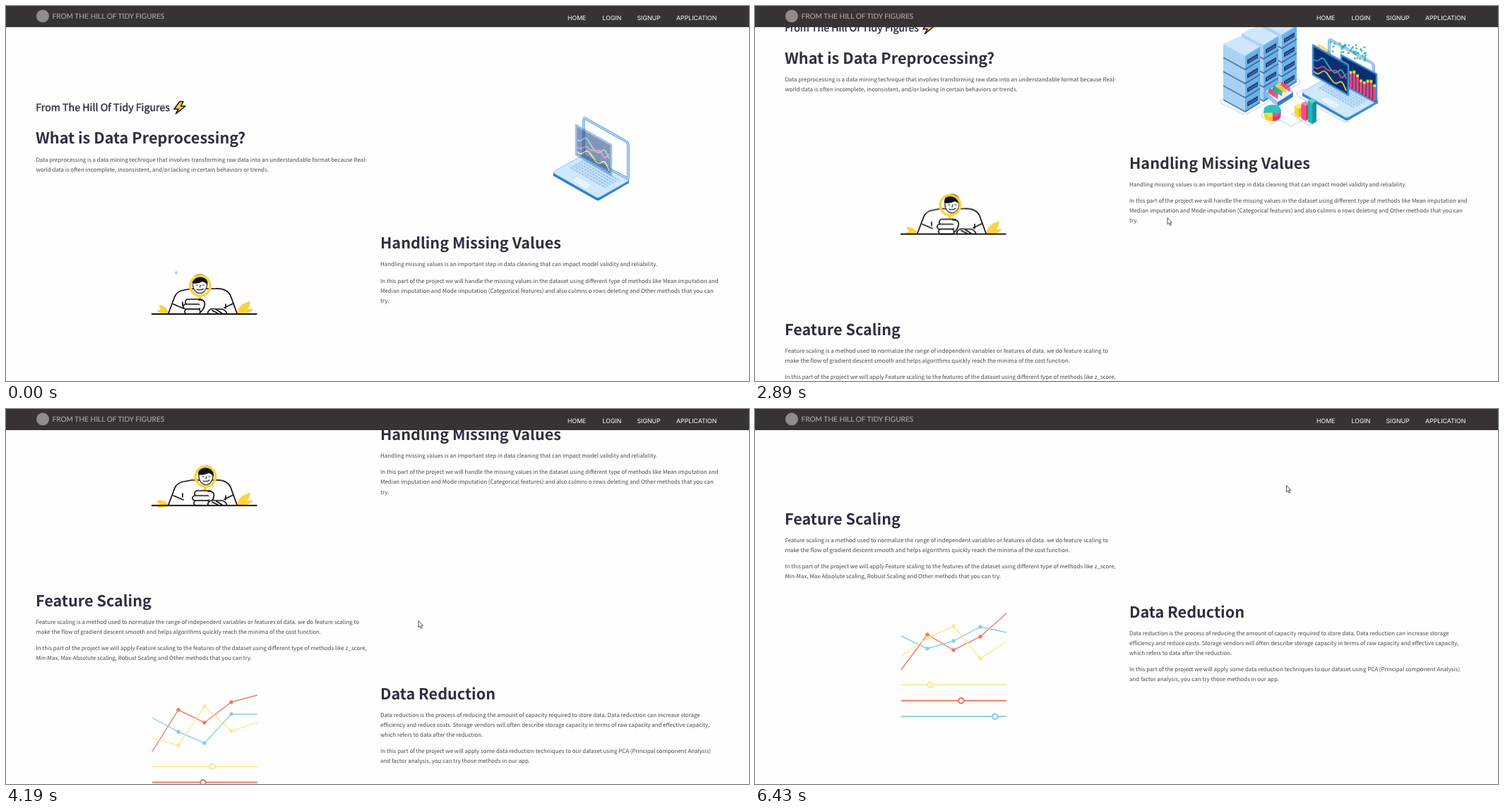
Write an HTML page that moves like this. It is 1052 px wide and 532 px high and loops after 6500 ms.

```html
<!DOCTYPE html>
<html lang="en">
<head>
<meta charset="utf-8">
<title>Data preprocessing</title>
<style>
html, body { margin: 0; width: 100%; height: 100%; overflow: hidden; background: #fefefe; }
svg { display: block; width: 100vw; height: 100vh; }
text { font-family: "Noto Sans CJK JP", "Noto Sans CJK SC", sans-serif; font-size: 7.91px; fill: #474752; text-rendering: geometricPrecision; white-space: pre; }
.title { font-size: 21.64px; font-weight: 700; fill: #2e2f3e; }
.lead { font-size: 14.2px; fill: #2e2f3e; stroke: #2e2f3e; stroke-width: .4px; }
.brand { font: 10.15px Lato, sans-serif; fill: #a5a2a2; stroke: #a5a2a2; stroke-width: .2px; }
.nav { font: 400 8.75px Inter, sans-serif; fill: #fff; }
.foot { font: 8.2px Lato, sans-serif; fill: #a3a3a6; }
.ink { fill: none; stroke: #111; stroke-width: 1.7px; stroke-linecap: round; stroke-linejoin: round; }
.fine { stroke-width: 1.1px; }
.white { fill: #fefefe; }
.thin { fill: none; stroke: #a9c8e6; stroke-width: 1px; }
.curve { fill: none; stroke-width: 1.4px; }
.slider { stroke-width: 1.9px; }
.knob { fill: #fefefe; stroke-width: 2.2px; }

.move { animation: 6.5s linear infinite; }
.page { animation-name: scroll; }
.cursor { animation-name: cursor; }
.lid { animation-name: lid; }
.front { animation-name: front; }
.side { animation-name: side; }
.dots { animation-name: dots; }
.bars { animation-name: bars; transform-origin: 0 281px; }
.link { animation-name: link; stroke-dasharray: 110; }
.pie { animation-name: pie; transform-origin: 732px 265px; }
.tower0, .tower1, .tower2 { transform-origin: 0 264px; }
.tower0 { animation-name: tower0; }
.tower1 { animation-name: tower1; }
.tower2 { animation-name: tower2; }
.floor { animation-name: floor; }
.drawer { animation-name: drawer; }
.lens { animation-name: lens; }
.head { animation-name: head; }
.fist { animation-name: fist; }
.leaf { animation-name: leaf; transform-origin: 231px 437px; }
.spark { animation-name: spark; }
.chart .move { animation-timing-function: ease-in-out; }
.curve.red { animation-name: red; }
.curve.blue { animation-name: blue; }
.curve.yellow { animation-name: yellow; }
.knob.red { animation-name: knobRed; }
.knob.blue { animation-name: knobBlue; }
.knob.yellow { animation-name: knobYellow; }

@keyframes scroll {
  0%, 36.9% { transform: translateY(0); }
  42.5% { transform: translateY(-95px); }
  52.77% { transform: translateY(-191px); }
  64.46% { transform: translateY(-300px); }
  83.1%, 86.1% { transform: translateY(-491px); }
  91.5%, 100% { transform: translateY(-416px); }
}
@keyframes cursor {
  0%, 8.2% { transform: translate(952px, 540px); }
  9.2% { transform: translate(945px, 525px); }
  10.3% { transform: translate(891px, 488px); }
  18% { transform: translate(795.5px, 476px); }
  21.2% { transform: translate(745px, 425px); }
  30.8%, 86.5% { transform: translate(583.5px, 300px); }
  98%, 100% { transform: translate(752px, 108px); }
}
@keyframes lid { 0% { transform: none; } 7%, 100% { transform: translate(-5px, 2px); } }
@keyframes front { 0% { transform: translate(17px, 0); opacity: .5; } 7%, 100% { transform: none; opacity: 1; } }
@keyframes side { 0%, 2% { transform: translate(-16px, -9px); opacity: 0; } 9%, 100% { transform: none; opacity: 1; } }
@keyframes dots { 0%, 10% { transform: translateY(14px); opacity: 0; } 16%, 100% { transform: none; opacity: 1; } }
@keyframes bars { 0%, 9% { transform: scaleY(0); } 15%, 100% { transform: none; } }
@keyframes link { 0%, 13% { stroke-dashoffset: 110; } 18% { stroke-dashoffset: 66; } 23%, 100% { stroke-dashoffset: 0; } }
@keyframes pie { 0%, 17.2% { transform: scale(0); } 18% { transform: scale(.2); } 22%, 100% { transform: none; } }
@keyframes tower0 { 0%, 23% { transform: scaleY(0); } 31.5%, 100% { transform: none; } }
@keyframes tower1 { 0%, 26% { transform: scaleY(0); } 33.8%, 100% { transform: none; } }
@keyframes tower2 { 0%, 28% { transform: scaleY(0); } 35.4%, 100% { transform: none; } }
@keyframes floor { 0%, 22% { opacity: 0; } 25%, 100% { opacity: 1; } }
@keyframes drawer { 0%, 38% { transform: translate(-16px, -9px); opacity: 0; } 45%, 100% { transform: none; opacity: 1; } }
@keyframes lens {
  0% { transform: translate(275px, 397px); }
  6%, 40% { transform: translate(268.5px, 396px); }
  48%, 100% { transform: translate(282.5px, 396px); }
}
@keyframes head {
  0% { transform: translate(274.5px, 394px); }
  6%, 40% { transform: translate(273.5px, 393px); }
  48%, 100% { transform: translate(283px, 394px); }
}
@keyframes fist {
  0% { transform: translateX(1px); }
  6%, 40% { transform: none; }
  48%, 100% { transform: translateX(14px); }
}
@keyframes leaf {
  0%, 50%, 54% { transform: none; }
  8%, 40%, 62%, 100% { transform: rotate(-22deg); }
}
@keyframes spark {
  0% { transform: translate(241px, 378.5px); opacity: 1; }
  4%, 49% { transform: translate(231px, 373px); opacity: 0; }
  52%, 54% { transform: translate(231px, 373px); opacity: .5; }
  57%, 100% { transform: translate(231px, 373px); opacity: 0; }
}
@keyframes red {
  0%, 52.77% { d: path("M207 786L244 735L281 741L319 709L356 706"); }
  64.46% { d: path("M207 786L244 727L281 745L319 716L356 706"); }
  85.38% { d: path("M207 786L244 759L281 713L319 727L356 707"); }
  98.9%, 100% { d: path("M207 786L244 736L281 758L319 739L356 706"); }
}
@keyframes blue {
  0%, 52.77% { d: path("M207 738L244 754L281 765L319 721L356 733"); }
  64.46% { d: path("M207 738L244 758L281 774L319 733L356 733"); }
  85.38% { d: path("M207 738L244 738L281 737L319 742L356 734"); }
  98.9%, 100% { d: path("M207 738L244 756L281 745L319 725L356 733"); }
}
@keyframes yellow {
  0%, 52.77% { d: path("M207 767L244 765L281 722L319 748L356 746"); }
  64.46% { d: path("M207 767L244 777L281 722L319 757L356 745"); }
  85.38% { d: path("M207 767L244 719L281 754L319 758L356 746"); }
  98.9%, 100% { d: path("M207 766L244 741L281 724L319 770L356 746"); }
}
@keyframes knobYellow { 0%, 64.46% { cx: 292px; } 85.38% { cx: 299px; } 98.9%, 100% { cx: 248px; } }
@keyframes knobRed { 0%, 64.46% { cx: 279px; } 85.38% { cx: 243px; } 98.9%, 100% { cx: 292px; } }
@keyframes knobBlue { 0%, 64.46% { cx: 300px; } 85.38% { cx: 318px; } 98.9%, 100% { cx: 340px; } }
</style>
</head>
<body>
<svg viewBox="0 0 1052 532" preserveAspectRatio="none">
<g class="page move">
  <text class="lead" x="42.3" y="149">From The Hill Of Tidy Figures</text>
  <path d="M246 135.500L238 146.300H244L240.500 152.800L254 142H247.600L251 135.500Z" fill="#fdc93c" stroke="#17171c" stroke-width="1.5" stroke-linejoin="round"/>
  <text class="title" x="42" y="195.3">What is Data Preprocessing?</text>
  <text x="42.4" y="220.6">Data preprocessing is a data mining technique that involves transforming raw data into an understandable format because Real-</text>
  <text x="42.4" y="234.8">world data is often incomplete, inconsistent, and/or lacking in certain behaviors or trends.</text>

  <text class="title" x="530" y="344.3">Handling Missing Values</text>
  <text x="530" y="369.4">Handling missing values is an important step in data cleaning that can impact model validity and reliability.</text>
  <text x="530" y="392.6">In this part of the project we will handle the missing values in the dataset using different type of methods like Mean imputation and</text>
  <text x="530" y="406.6">Median imputation and Mode imputation (Categorical features) and also culmns o rows deleting and Other methods that you can</text>
  <text x="530" y="420.7">try.</text>

  <text class="title" x="42" y="580.2">Feature Scaling</text>
  <text x="42.4" y="605.4">Feature scaling is a method used to normalize the range of independent variables or features of data. we do feature scaling to</text>
  <text x="42.4" y="619.4">make the flow of gradient descent smooth and helps algorithms quickly reach the minima of the cost function.</text>
  <text x="42.4" y="642.4">In this part of the project we will apply Feature scaling to the features of the dataset using different type of methods like z_score,</text>
  <text x="42.4" y="656.4">Min-Max, Max-Absolute scaling, Robust Scaling and Other methods that you can try.</text>

  <text class="title" x="530" y="711.7">Data Reduction</text>
  <text x="530" y="736.8">Data reduction is the process of reducing the amount of capacity required to store data. Data reduction can increase storage</text>
  <text x="530" y="750.8">efficiency and reduce costs. Storage vendors will often describe storage capacity in terms of raw capacity and effective capacity,</text>
  <text x="530" y="764.9">which refers to data after the reduction.</text>
  <text x="530" y="788.1">In this part of the project we will apply some data reduction techniques to our dataset using PCA (Principal component Analysis)</text>
  <text x="530" y="802.1">and factor analysis, you can try those methods in our app.</text>
  <text class="foot" x="45" y="1014">• From the hill of tidy figures © 2022</text>

  <!-- servers -->
  <path class="thin floor move" d="M663 243L660 246Q657 250 661 252L690 266Q694 268 698 266L770 224Q774 221 770 218L766 216"/>
  <g id="towers"></g>
  <g class="drawer move">
    <path d="M723 235L745 222L763 237L741 251Z" fill="#e3f1fd" stroke="#3f8fd0"/>
    <path d="M741 251L763 237V243L741 257Z" fill="#2c6db4"/>
    <path d="M723 235L741 251V257L723 241Z" fill="#8fc3ee"/>
    <path d="M727 237l3-7 12 9-1 7z" fill="#ea4f7b"/>
    <path d="M733 233l3-7 12 9-1 7z" fill="#28b08f"/>
    <path d="M739 229l3-6 12 8-1 7z" fill="#f8cf2c"/>
    <path d="M745 226l2-5 12 8-1 7z" fill="#ea4f7b"/>
  </g>

  <!-- laptop -->
  <path class="thin side move" d="M778 231L768 236Q765 238 768 241L833 277Q837 280 841 277"/>
  <path d="M775 236V241L835 275Q838 277 841 275L882 251V246L838 271Z" fill="#2f7fc9"/>
  <path d="M777 234L816 212Q818 211 820 212L880 245Q883 247 880 249L841 271Q838 273 835 271L777 238Q774 236 777 234Z" fill="#cfe8fc" stroke="#7cb8ea" stroke-width=".8"/>
  <g id="keys" stroke="#a3caee" stroke-width="2.6" stroke-dasharray="3.6 1"></g>
  <path d="M800 247L809 242L830 254L821 260Z" fill="#e6f3fe" stroke="#b6d8f4" stroke-width=".6"/>
  <g class="lid move" fill="none" stroke-linejoin="round">
    <path d="M818 212V162Q818 158 821 160L878 192Q881 194 881 198V245Z" stroke="#4a8fd2" stroke-width="3.4"/>
    <path d="M818 212V162Q818 158 821 160L878 192Q881 194 881 198V245Z" stroke="#c4e0f8" stroke-width="1.6"/>
  </g>
  <g class="side move">
    <path d="M830 183L880 210V251L830 223Z" fill="#0b2f72" stroke="#3d8dd2" stroke-width="2.4" stroke-linejoin="round"/>
    <g id="columns" stroke-width="3.9"></g>
    <path d="M798 181V171Q798 169 800 170L810 176Q812 177 812 179V189" fill="none" stroke="#f9cf32" stroke-width="2.2"/>
  </g>
  <g class="front move">
    <path d="M790 169L840 197V240L790 211Z" fill="#0b2f72" stroke="#3d8dd2" stroke-width="2.6" stroke-linejoin="round"/>
    <g fill="none" stroke-width="1.7" stroke-linecap="round">
      <path d="M792 190C799 196 801 180 808 192S820 212 826 206S833 210 837 216" stroke="#2bbcc9"/>
      <path d="M792 200C798 207 802 194 808 202S822 199 827 210S833 212 837 210" stroke="#ef4f84"/>
      <path d="M792 207C800 216 803 199 810 209S820 226 826 222S833 225 837 233" stroke="#fadb3c"/>
    </g>
  </g>
  <g id="dots" class="dots move" fill="#27adb4"></g>

  <!-- small charts -->
  <path class="thin link move" d="M779 273L759 284L742 275L731 281L718 271Q716 268 719 265L724 262"/>
  <g class="bars move">
    <path class="thin" d="M764 264L760 267L784 283L799 274L796 272"/>
    <g id="bars"></g>
  </g>
  <g class="pie move">
    <path d="M721 264V270A12 7.500 0 0 0 733 277V266Z" fill="#f4cb25"/>
    <path d="M733 266V277A12 7.500 0 0 0 744.500 270V263Z" fill="#d93b6c"/>
    <path d="M720.500 261A12 7.500 0 0 1 744.500 261V265L733 266L720.500 265Z" fill="#149a9f"/>
    <ellipse cx="732.5" cy="261" rx="12" ry="7" fill="#2ac3c0"/>
    <path d="M732.500 265L721.500 265A11.500 7 0 0 0 732.500 271Z" fill="#fbdd41"/>
    <path d="M733 265V271A11.500 7 0 0 0 744 265Z" fill="#ef5186"/>
  </g>

  <!-- person with magnifier -->
  <g fill="#fbd23f">
    <g class="leaf move">
      <path d="M231 437Q217 433 217 424Q228 425 231 437Z"/>
      <path d="M230 437Q218 438 214 432Q222 428 230 437Z"/>
    </g>
    <path d="M327 437Q329 422 346 419Q345 434 327 437Z"/>
    <path d="M329 437Q336 428 350 430Q345 438 329 437Z"/>
  </g>
  <path class="ink white" d="M230 436L239 412Q243 404 252 403L263 401H296Q313 400 318 411L327 436"/>
  <path class="ink" d="M237 423L251 429M250 420V425M322 422L309 428M311 423V429"/>
  <g class="head move">
    <ellipse class="ink fine white" cy="1" rx="10" ry="12.500"/>
    <path d="M-11 -1Q-11 -13 0 -13.500Q12 -13 11 2Q8 -2 4 -3Q-4 1 -11 -1Z" fill="#111"/>
    <path class="ink fine" d="M-5 2H-3M4 2H6M1 2L0 5M-4 8Q1 10 5 7"/>
  </g>
  <g class="lens move">
    <path d="M0 14L-2 25" stroke="#fbd23f" stroke-width="4"/>
    <circle r="14.2" fill="none" stroke="#fbd23f" stroke-width="3.6"/>
  </g>
  <g class="fist move">
    <rect class="ink white" x="253" y="416" width="25" height="8" rx="4"/>
    <rect class="ink white" x="250" y="423" width="25" height="7" rx="3.5"/>
    <rect class="ink white" x="252" y="430" width="22" height="7" rx="3.5"/>
    <path class="ink white" d="M275 434Q282 426 280 420Q278 416 272 417"/>
  </g>
  <path class="ink white" d="M286 434Q289 428 297 430L306 430Q312 432 313 437H289Q285 437 286 434ZM292 432L300 436M298 431L306 436"/>
  <path d="M206 437H355.5" stroke="#111" stroke-width="1.9"/>
  <path class="spark move" d="M0 -2.7L2.7 0L0 2.7L-2.7 0Z" fill="#a4dfee"/>

  <g id="chart" class="chart"></g>
</g>

<rect width="1052" height="30" fill="#373334"/>
<circle cx="52" cy="14.3" r="9" fill="#8f8c8b"/>
<text class="brand" x="65.5" y="17.9">FROM THE HILL OF TIDY FIGURES</text>
<text class="nav" x="795" y="19.8">HOME</text>
<text class="nav" x="844.5" y="19.8">LOGIN</text>
<text class="nav" x="893.5" y="19.8">SIGNUP</text>
<text class="nav" x="949" y="19.8">APPLICATION</text>
<path class="cursor move" d="M.5 .5V9.7L2.7 7.8L4.2 11.2L5.7 10.5L4.2 7.2H6.9Z" fill="#fff" stroke="#222" stroke-width=".8"/>
</svg>
<script>
const fill = (id, markup) => { document.getElementById(id).innerHTML = markup; };
const repeat = (n, make) => Array.from({ length: n }, (_, i) => make(i)).join('');
const shape = (d, color) => `<path d="${d}" fill="${color}"/>`;

// One server: four stacked units under a light top face.
const unit = k => {
  const y = 167 + 20 * k;
  return shape(`M663 ${y}l31 17v20l-31 -17z`, '#a8d1f3') +
    shape(`M694 ${y + 17}l21 -13v20l-21 13z`, '#6db1e7') +
    `<path d="M663 ${y + 19.5}l31 17l21 -13" fill="none" stroke="#1f4a86" stroke-width="1.1"/>` +
    shape(`M697 ${y + 23}l15 -9v6l-15 9z`, '#17376f') +
    `<path d="M699 ${y + 25}l12 -7" stroke="#9fd0f5" stroke-width="1.3" stroke-dasharray="1.3 1.2"/>`;
};
const tower = i => `<g transform="translate(${26 * i} ${-15 * i})"><g class="tower${i} move">` +
  repeat(4, k => unit(3 - k)) + shape('M663 167L687 156L715 171L694 184Z', '#cfe7fc') + '</g></g>';
fill('towers', tower(2) + tower(1) + tower(0));

fill('keys', repeat(6, i => {
  const v = .42 + i * .085;
  return `<path d="M${781 + 43 * v} ${239.5 - 25 * v}l50 28.6"/>`;
}));

fill('columns', repeat(8, i => {
  const x = 843.5 + i * 4.8, base = 229.5 + i * 2.65, height = 19 + 4 * Math.sin(i * 1.3 + .2);
  return `<path d="M${x} ${base}v${-height}" stroke="#e2487f"/>` +
    `<path d="M${x} ${base - height}v-4" stroke="#fadb3c"/>`;
}));

let seed = 7;
const random = () => (seed = seed * 16807 % 2147483647) / 2147483647;
fill('dots', repeat(42, () => {
  const u = random(), x = 812 + u * 56, y = 158 + u * 14 + random() * 22;
  return `<ellipse cx="${x}" cy="${y}" rx="1.5" ry="1.2"/>`;
}));

const bar = ([x, top, base, lit, left, right]) =>
  shape(`M${x} ${top}l6 3.5V${base}l-6 -3.5z`, left) +
  shape(`M${x + 6} ${top + 3.5}l6 -3.5V${base - 3.5}l-6 3.5z`, right) +
  shape(`M${x} ${top}l6 -3.5l6 3.5l-6 3.5z`, lit);
fill('bars', [
  [764, 255, 272, '#fde873', '#fbd52f', '#e3b41c'],
  [773.5, 251.5, 276.5, '#f787ad', '#ef4f84', '#cf3467'],
  [783, 247.5, 281, '#5ad6d3', '#25b5b9', '#16949c']
].map(bar).join(''));

const series = [['red', '#ea7a62', 829.8], ['blue', '#87d1d9', 852.2], ['yellow', '#f9e88d', 807.4]];
fill('chart', series.map(([name, color, y]) =>
  `<marker id="${name}Dot" markerUnits="userSpaceOnUse" markerWidth="6" markerHeight="6" refX="3" refY="3">` +
  `<circle cx="3" cy="3" r="2.7" fill="${color}"/></marker>` +
  `<path class="curve move ${name}" stroke="${color}" marker-mid="url(#${name}Dot)"/>` +
  `<path class="slider" d="M207 ${y}H356" stroke="${color}"/>` +
  `<circle class="knob move ${name}" cy="${y}" r="3.7" stroke="${color}"/>`).join(''));
</script>
</body>
</html>
```
